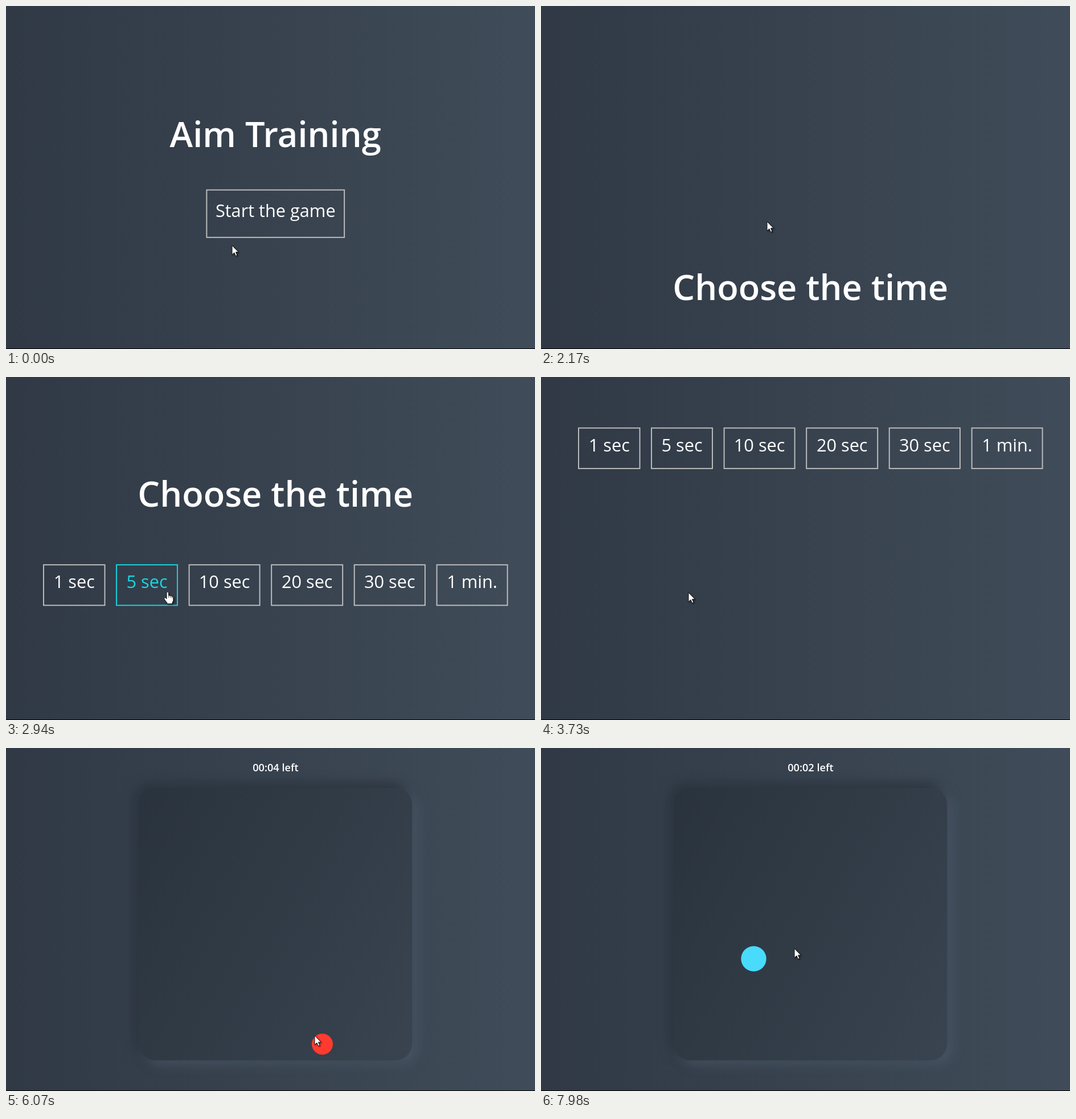
An HTML page for the animation above (8 s loop, 929x603 px).

```html
<!DOCTYPE html>
<html lang="en">
<head>
<meta charset="utf-8">
<title>Aim Training</title>
<style>
  html, body { margin: 0; width: 100%; height: 100%; overflow: hidden; background: #000; }
  svg { display: block; width: 929px; height: 603px; }
  text { font-family: "Open Sans", "Noto Sans", sans-serif; fill: #fff; text-anchor: middle; }
  .title { font-size: 61.4px; font-weight: 600; }
  .timer { font-size: 18.2px; font-weight: 600; }
  .btn text { font-size: 30.72px; }
  .btn rect { fill: none; stroke: #c0c0c0; stroke-width: 1.9; }
  .btn.on rect { stroke: #16d9e3; }
  .btn.on text { fill: #16d9e3; }
</style>
</head>
<body>
<svg viewBox="0 0 929 603" xmlns="http://www.w3.org/2000/svg">
  <defs>
    <linearGradient id="page" gradientUnits="userSpaceOnUse" x1="-400" y1="0" x2="1395" y2="0">
      <stop offset="0" stop-color="#29313c"/><stop offset="1" stop-color="#485563"/>
    </linearGradient>
    <linearGradient id="felt" gradientUnits="userSpaceOnUse" x1="161" y1="141" x2="1333" y2="774">
      <stop offset="0" stop-color="#29323c"/><stop offset="1" stop-color="#485563"/>
    </linearGradient>
    <filter id="soft" x="-20%" y="-20%" width="140%" height="140%" color-interpolation-filters="sRGB">
      <feGaussianBlur stdDeviation="9.6"/>
    </filter>
    <filter id="drop" x="-50%" y="-50%" width="220%" height="220%" color-interpolation-filters="sRGB">
      <feDropShadow dx="1.5" dy="1.5" stdDeviation="1.2" flood-color="#000" flood-opacity=".5"/>
    </filter>
    <clipPath id="view"><rect width="929" height="602"/></clipPath>
  </defs>
  <g clip-path="url(#view)">
    <rect width="929" height="602" fill="url(#page)"/>
    <g id="start"><text class="title" x="473.2" y="248">Aim Training</text></g>
    <g id="times"><text class="title" x="473.2" y="227.5">Choose the time</text></g>
    <g id="game">
      <rect x="243" y="77" width="480" height="479" rx="29" fill="#475462" filter="url(#soft)"/>
      <rect x="225" y="62" width="480" height="479" rx="29" fill="#2a333d" filter="url(#soft)"/>
      <rect x="233" y="70" width="480" height="479" rx="29" fill="url(#felt)"/>
      <text class="timer" id="timer" x="473.5" y="41.3"></text>
      <circle id="dot"/>
    </g>
    <g id="cursor" filter="url(#drop)" stroke-linejoin="round">
      <path id="arrow" d="M0 0V16.2L3.9 12.7L6.5 18.4L9 17.3L6.5 11.7H11.4Z"
        fill="#fff" stroke="#111" stroke-width="1"/>
      <g id="hand">
        <path d="M-1.8 1.2Q0 -1.8 1.8 1.2V6.4Q3.6 5.2 4.8 7Q6.6 6.2 7.6 7.9Q9.8 7.4 10 9.8
          V14.5Q9.6 17 8.2 18.6V20.8H-1V18.6Q-3.5 16.4 -5.6 12.8Q-6.8 10.4 -5 9.8Q-3.6 9.6 -1.8 12Z"
          fill="#fff" stroke="#111" stroke-width="1"/>
        <path d="M1.8 6.4V10M4.8 7.4V10.4M7.6 8.2V10.8" fill="none" stroke="#333" stroke-width=".8"/>
      </g>
    </g>
  </g>
</svg>
<script>
const LOOP = 8000, PAGE = 907, SLIDE = 500;
const TO_TIMES = 1923, TO_GAME = 3646, FIRST_TICK = 5110;

// time, x, y of the pointer
const PATH = [
  [1020, 397, 421], [1640, 397, 379], [2740, 397, 379], [2840, 335, 378],
  [2940, 284, 378], [3190, 259, 379], [4130, 259, 379], [4350, 335, 333],
  [4560, 489, 232], [4800, 515, 135], [5100, 520, 84], [5270, 520, 84],
  [5560, 493, 230], [5820, 519, 430], [6010, 542, 505.5], [6130, 542, 505.5],
  [6480, 522, 330], [6800, 506, 238], [6920, 506, 238], [7250, 503, 214],
  [7720, 503, 214], [7850, 486, 264], [7980, 445, 352.5]
];
// time shown from, x, y, radius, colour
const DOTS = [
  [0, 519, 86, 12.6, '#3498db'],
  [5260, 555.5, 520.7, 18.5, '#ff3b30'],
  [6100, 495, 217, 23, '#3498db'],
  [7400, 373.5, 370.5, 22.2, '#48dbfb']
];

const $ = id => document.getElementById(id);
const NS = 'http://www.w3.org/2000/svg';
const set = (el, attrs) => { for (const k in attrs) el.setAttribute(k, attrs[k]); };
const add = (parent, tag, attrs) => {
  const el = document.createElementNS(NS, tag);
  set(el, attrs);
  return parent.appendChild(el);
};

function button(screen, label, x, y, w, h) {
  const el = add($(screen), 'g', { class: 'btn' });
  add(el, 'rect', { x, y, width: w, height: h });
  add(el, 'text', { x: x + w / 2, y: 371.3 }).textContent = label;
  return { el, screen, x, y, w, h };
}
const buttons = [
  button('start', 'Start the game', 352.4, 323.4, 241.8, 83.4),
  ...[['1 sec', 66, 107.5], ['5 sec', 194, 107], ['10 sec', 321.6, 124],
    ['20 sec', 466.2, 125], ['30 sec', 611.7, 124.2], ['1 min.', 756.6, 124]
  ].map(([label, x, w]) => button('times', label, x, 330.2, w, 71.2))
];

// cubic-bezier(0, 0, .58, 1)
function easeOut(x) {
  if (x <= 0) return 0;
  if (x >= 1) return 1;
  let lo = 0, hi = 1;
  for (let i = 0; i < 24; i++) {
    const u = (lo + hi) / 2;
    if (1.74 * u * u * (1 - u) + u * u * u < x) lo = u; else hi = u;
  }
  return lo * lo * (3 - 2 * lo);
}

// smooth curve through the points that never overshoots
function along(t, axis) {
  const last = PATH.length - 1;
  if (t <= PATH[0][0]) return PATH[0][axis];
  if (t >= PATH[last][0]) return PATH[last][axis];
  const slope = i => (PATH[i + 1][axis] - PATH[i][axis]) / (PATH[i + 1][0] - PATH[i][0]);
  const tangent = i => {
    if (i === 0 || i === last) return 0;
    const a = slope(i - 1), b = slope(i);
    return a * b <= 0 ? 0 : 2 * a * b / (a + b);
  };
  const i = PATH.findIndex(p => p[0] > t) - 1;
  const span = PATH[i + 1][0] - PATH[i][0], u = (t - PATH[i][0]) / span, v = 1 - u;
  return PATH[i][axis] * v * v * (1 + 2 * u) + PATH[i + 1][axis] * u * u * (3 - 2 * u)
    + span * u * v * (tangent(i) * v - tangent(i + 1) * u);
}

function activeScreen(t) {
  if (t < TO_TIMES + 45) return 'start';
  if (t > TO_TIMES + SLIDE + 95 && t < TO_GAME + 45) return 'times';
  return '';
}

function draw(t) {
  const scroll = PAGE * (easeOut((t - TO_TIMES) / SLIDE) + easeOut((t - TO_GAME) / SLIDE));
  ['start', 'times', 'game'].forEach((id, i) =>
    set($(id), { transform: `translate(0 ${(i * PAGE - scroll).toFixed(2)})` }));

  const x = along(t, 1), y = along(t, 2), screen = activeScreen(t);
  let over = false;
  for (const b of buttons) {
    const hit = b.screen === screen && x >= b.x && x <= b.x + b.w && y >= b.y && y <= b.y + b.h;
    b.el.classList.toggle('on', hit);
    over = over || hit;
  }
  set($('cursor'), { transform: `translate(${x.toFixed(2)} ${y.toFixed(2)})` });
  set($('arrow'), { visibility: over ? 'hidden' : 'visible' });
  set($('hand'), { visibility: over ? 'visible' : 'hidden' });

  const ticks = Math.max(0, Math.floor((t - FIRST_TICK) / 1000) + 1);
  $('timer').textContent = ticks ? `00:0${5 - ticks} left` : '00:5 left';

  const [, cx, cy, r, fill] = DOTS.filter(d => d[0] <= t).pop();
  set($('dot'), { cx, cy, r, fill });
}

const begin = performance.now();
function frame() {
  draw((performance.now() - begin) % LOOP);
  requestAnimationFrame(frame);
}
draw(0);
requestAnimationFrame(frame);
</script>
</body>
</html>
```
